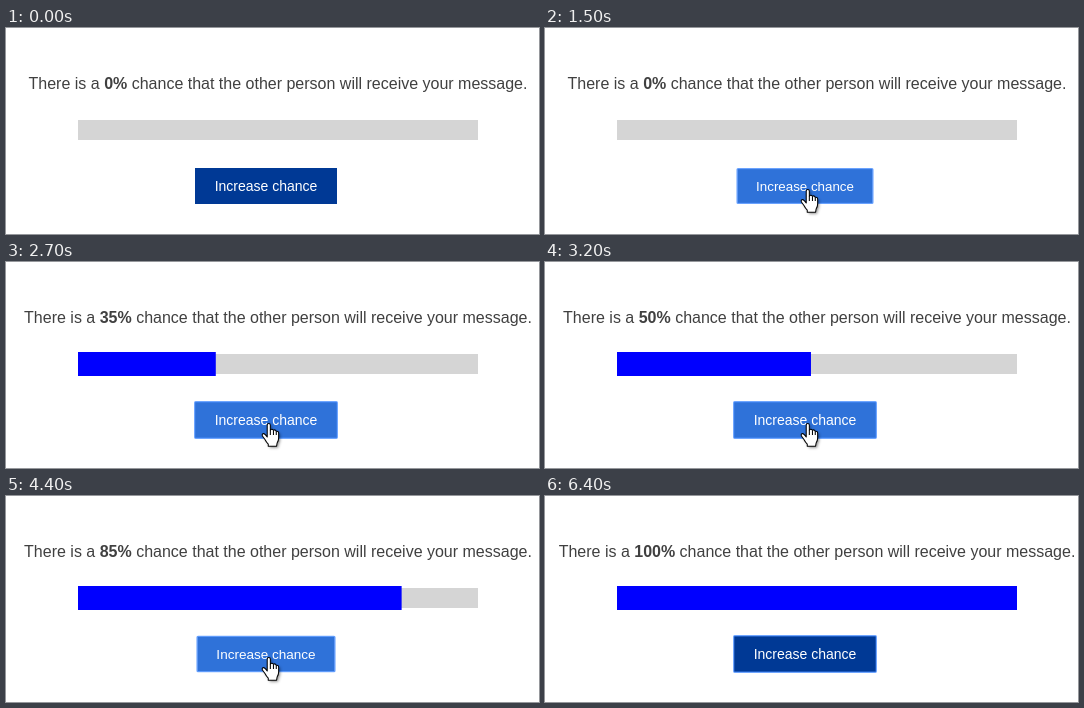
Write an HTML page with a canvas that moves like this. It is 533 px wide and 206 px high and loops after 6600 ms.

```html
<!DOCTYPE html>
<html lang="en">
<head>
<meta charset="utf-8">
<title>Increase chance</title>
<style>
html, body { margin: 0; width: 100%; height: 100%; overflow: hidden; background: #fff; }
canvas { display: block; }
</style>
</head>
<body>
<canvas id="stage" width="533" height="206"></canvas>
<script>
const ctx = document.getElementById('stage').getContext('2d', { alpha: false });
const LOOP = 6600, STEP = 100;
const FIRST = 1595, PERIOD = 175, CLICKS = 20, GAIN = 5;
const FAMILY = '"Liberation Sans", Arial, sans-serif';
const BUTTON = { x: 260, y: 158, w: 142, h: 36 };
const REST = { x: 263, y: 161 };

const HAND = new Path2D('M5.5 13V2Q5.5 .5 7 .5Q8.5 .5 8.5 2V6.5Q10 5 11.5 6.7Q13.2 5.8 14.2 7.6' +
  'Q16.5 7.4 16.5 9.5V14Q16.5 16.5 15 18.5L14.5 21.5H6.5V19.5Q4.4 17.5 3.5 15.5L.9 12Q.2 10.1 1.8 9.7Q3.4 9.8 5.5 13Z');
const KNUCKLES = new Path2D('M8.5 6.5V11M11.5 6.7V11M14.2 7.6V11');
const ARROW = new Path2D('M.5 .5V16.5L4.2 13L6.8 18.7L9.2 17.6L6.7 12.2H11.8Z');

const clamp = v => Math.max(0, Math.min(1, v));
const mix = (a, b, p) => a + (b - a) * p;

// Counter, bar and button size follow from the time since the latest click.
function clickState(t) {
  if (t < FIRST) return { percent: 0, bar: 0, scale: t < 1500 ? 1 : 0.952 };
  const n = Math.min(CLICKS - 1, Math.floor((t - FIRST) / PERIOD));
  const age = t - FIRST - n * PERIOD;
  const up = clamp((age + 7) / 37);
  const down = n < CLICKS - 1 ? clamp((age - 65) / 37) : 0;
  return {
    percent: (n + 1) * GAIN,
    bar: (n + 1 - Math.exp(-age / 25)) * GAIN,
    scale: 0.95 + 0.05 * (up - down)
  };
}

function pointerAt(t) {
  if (t < 1000 || t >= 6400) return null;
  if (t < 1300) {
    const p = (t - 1000) / 300;
    return { x: mix(129, REST.x, p), y: mix(197, REST.y, p) };
  }
  if (t < 6100) return REST;
  const p = (t - 6000) / 300;
  return { x: mix(REST.x, 353, p), y: mix(REST.y, 198, p) };
}

function isOver(p) {
  return !!p && Math.abs(p.x - BUTTON.x) < BUTTON.w / 2 && Math.abs(p.y - BUTTON.y) < BUTTON.h / 2;
}

function drawSentence(percent) {
  const parts = [
    ['There is a ', 'normal'],
    [percent + '%', 'bold'],
    [' chance that the other person will receive your message.', 'normal']
  ];
  const font = weight => `${weight} 16px ${FAMILY}`;
  const widths = parts.map(([text, weight]) => {
    ctx.font = font(weight);
    return ctx.measureText(text).width;
  });
  let x = 272 - widths.reduce((a, b) => a + b) / 2;
  ctx.fillStyle = '#404040';
  ctx.textAlign = 'left';
  parts.forEach(([text, weight], i) => {
    ctx.font = font(weight);
    ctx.fillText(text, x, 61);
    x += widths[i];
  });
}

function drawBar(percent) {
  ctx.fillStyle = '#d5d5d5';
  ctx.fillRect(72, 92, 400, 20);
  ctx.fillStyle = '#0000ff';
  ctx.fillRect(72, 90, percent * 4, 24);
}

function drawButton(scale, hover, focus) {
  const { x, y, w, h } = BUTTON;
  ctx.save();
  ctx.translate(x, y);
  ctx.scale(scale, scale);
  ctx.fillStyle = hover ? '#2f72d9' : '#003995';
  ctx.fillRect(-w / 2, -h / 2, w, h);
  if (focus) {
    ctx.strokeStyle = 'rgba(77, 144, 254, 0.8)';
    ctx.lineWidth = 1.4;
    ctx.beginPath();
    ctx.roundRect(-w / 2 - 0.3, -h / 2 - 0.3, w + 0.6, h + 0.6, 1);
    ctx.stroke();
  }
  ctx.fillStyle = '#fff';
  ctx.font = `14px ${FAMILY}`;
  ctx.textAlign = 'center';
  ctx.fillText('Increase chance', 0, 5);
  ctx.restore();
}

function drawPointer(p, hand) {
  const shape = hand ? HAND : ARROW;
  ctx.save();
  if (hand) {
    ctx.translate(p.x - 7.5, p.y);
    ctx.scale(1.04, 1.08);
  } else {
    ctx.translate(p.x, p.y);
  }
  ctx.lineJoin = 'round';
  ctx.lineWidth = 1;
  ctx.strokeStyle = '#000';
  ctx.fillStyle = '#fff';
  ctx.shadowColor = 'rgba(0, 0, 0, 0.45)';
  ctx.shadowBlur = 3;
  ctx.shadowOffsetX = 1.5;
  ctx.shadowOffsetY = 1.5;
  ctx.fill(shape);
  ctx.shadowColor = 'transparent';
  ctx.stroke(shape);
  if (hand) ctx.stroke(KNUCKLES);
  ctx.restore();
}

function draw(now) {
  const t = Math.floor((now % LOOP) / STEP) * STEP;
  const state = clickState(t);
  const pointer = pointerAt(t);
  const over = isOver(pointer);
  ctx.fillStyle = '#fff';
  ctx.fillRect(0, 0, 533, 206);
  drawSentence(state.percent);
  drawBar(state.bar);
  drawButton(state.scale, over, t >= 1500);
  if (pointer) drawPointer(pointer, over);
}

const start = performance.now();
function frame() {
  draw(performance.now() - start);
  requestAnimationFrame(frame);
}
frame();
</script>
</body>
</html>
```
